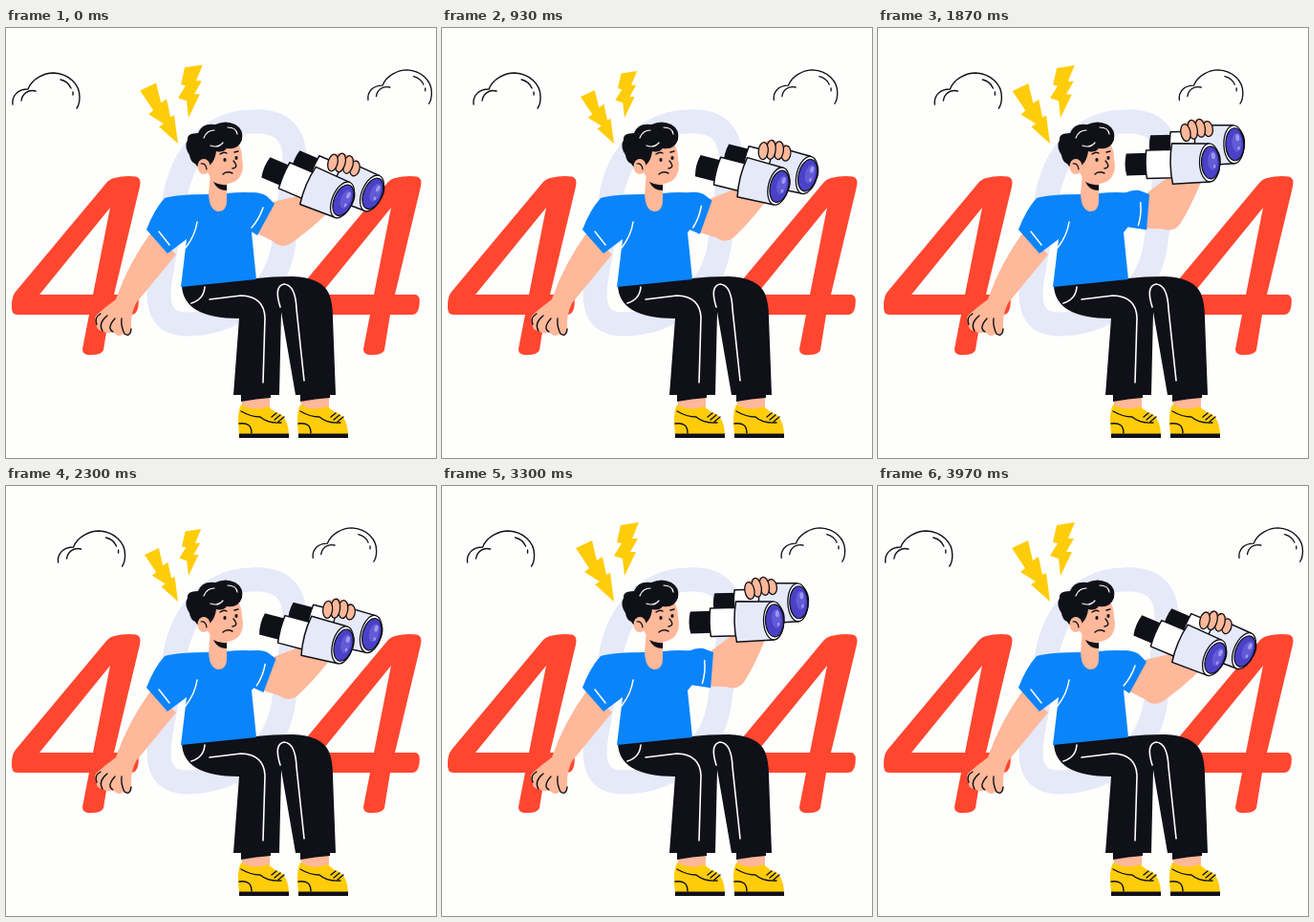
Recreate the animation shown at these times as an HTML page with a canvas. Size 450x450 px, loop 4 s.

```html
<!DOCTYPE html>
<html lang="en">
<head>
<meta charset="utf-8">
<title>404</title>
<style>
html, body { margin: 0; width: 100%; height: 100%; overflow: hidden; background: #fefefc; }
canvas { display: block; width: 100vw; height: 100vh; }
</style>
</head>
<body>
<canvas id="stage" width="450" height="450"></canvas>
<script>
const ctx = document.getElementById('stage').getContext('2d');
const LOOP = 4000;
const C = {
  paper: '#fefefc', pale: '#e5e9f8', orange: '#ff4730', yellow: '#ffcc0a', ink: '#101018',
  skin: '#ffb899', blue: '#0a84fb', white: '#ffffff', lens: '#4a41c8', shine: '#9c98f0'
};

function fill(d, color, rule = 'nonzero') {
  ctx.fillStyle = color;
  ctx.fill(new Path2D(d), rule);
}

function line(d, color = C.ink, width = 1.5) {
  ctx.strokeStyle = color;
  ctx.lineWidth = width;
  ctx.lineCap = ctx.lineJoin = 'round';
  ctx.stroke(new Path2D(d));
}

function oval(x, y, rx, ry, color, outline = 0, turn = 0) {
  ctx.beginPath();
  ctx.ellipse(x, y, rx, ry, turn, 0, Math.PI * 2);
  ctx.fillStyle = color;
  ctx.fill();
  if (outline) {
    ctx.strokeStyle = C.ink;
    ctx.lineWidth = outline;
    ctx.stroke();
  }
}

function shifted(x, y, draw, scale = 1) {
  ctx.save();
  ctx.translate(x, y);
  ctx.scale(scale, scale);
  draw();
  ctx.restore();
}

const ease = u => (1 - Math.cos(Math.PI * u)) / 2;

// Eased value between [time, value] keys
function keyed(keys, t) {
  let i = 1;
  while (i < keys.length - 1 && t > keys[i][0]) i++;
  const [t0, a] = keys[i - 1], [t1, b] = keys[i];
  return a + (b - a) * ease((t - t0) / (t1 - t0));
}

function four() {
  fill('M113 157Q125 154 136 155.5Q142 157 140 166L113 279H135Q140 280 138.5 291Q137 300 131 300H108' +
    'L102 337Q100 342 90 342Q80 343 80 336L87 300H12Q5 300 6 290Q6 281 10 276L106 161Q109 158 113 157Z' +
    'M109 188L35 279H91Z', C.orange, 'evenodd');
}

function zero() {
  line('M258 98C292 96 306 115 301 150L290 230C280 285 230 310 190 310C165 310 157 295 161 265' +
    'L178 170C190 120 225 98 258 98Z', C.pale, 25);
}

function cloud() {
  line('M1 34C0 25 6 18 17 18C21 7 34 1 44 1C60 2 71 13 71 26Q71 34 68 38' +
    'M10 30C11 23 17 18 25 20M51 8Q59 10 62 17M64 21V24', C.ink, 1.4);
}

function bolts(scale) {
  shifted(180, 121, () =>
    fill('M-40 -56L-23 -64L-18 -43L-12 -47L-8 -28L-4 -30L0 0L-20 -18L-15 -21L-31 -31L-26 -35Z', C.yellow), scale);
  shifted(191, 94, () =>
    fill('M-4 -53L15 -56L8 -39L14 -39L6 -25L12 -25L0 0L-2 -18L-11 -21L-3 -34L-8 -35Z', C.yellow), scale);
}

function leftArm() {
  fill('M153 212Q127 248 115 284Q104 292 95 300Q91 305 95 310Q94 316 101 317Q107 321 112 318' +
    'Q118 325 123 320Q130 324 131 315Q130 300 136 288L178 237Z', C.skin);
  line('M99 299Q92 303 95 310M106 301Q96 309 101 317M114 304Q105 314 112 318' +
    'M121 304Q120 312 124 320Q130 324 131 315', C.ink, 1.4);
}

function shoe() {
  fill('M247 383H276V401H247Z', C.skin);
  fill('M246 383H277V387Q262 388 246 391Z', C.ink);
  fill('M246 394Q260 402 274 396L282 402Q295 405 296 425H244Q241 404 246 394Z', C.yellow);
  fill('M244 424.5H296V429H244Z', C.ink);
  line('M246 401Q256 407 266 407Q274 414 288 413M244 414Q257 412 257 424' +
    'M278 407L283 403M281 410L287 405M285 412L291 407', C.ink, 1.4);
}

function legs() {
  shoe();
  shifted(62, 0, shoe);
  fill('M184 269L262 262Q278 260 300 260Q330 261 338 278Q342 288 342 303L345 384H303L288 297L286 384H238' +
    'L244 304Q185 304 184 269Z', C.ink);
  line('M194 288Q207 284 208 271M213 284L246 280Q270 281 271 303L269 371' +
    'M287 292Q280 270 291 268Q303 269 304 294L312 369', C.white, 1.6);
}

function torso() {
  fill('M213 174Q180 174 166 178Q155 190 147 211L169 236L189 221L183 271L262 263L257 214Q270 200 272 184' +
    'L266 173Q248 171 231 173Z', C.blue);
  line('M200 203Q198 217 188 230M160 213L171 227', C.white);
}

function head() {
  fill('M214 150L231 156V180Q231 192 222 192Q213 191 212 174Z', C.skin);
  fill('M217 161Q224 165 231 164V170Q221 170 217 161Z', C.ink);
  fill('M211 128L240 118Q247 124 247 137Q250 148 244 157Q237 164 227 163Q213 160 209 146Z', C.skin);
  fill('M208 147Q201 148 198 142Q193 140 192 133Q186 124 190 117Q189 110 201 110Q205 99 219 101' +
    'Q230 96 240 101Q249 106 247 117Q243 128 231 126Q227 131 220 129Q219 138 214 143Z', C.ink);
  oval(207, 145, 6.5, 8, C.skin);
  line('M204 142Q209 141 210 148', C.ink, 1.2);
  line('M207 115Q210 107 218 107M232 104Q241 104 242 111M214 123Q222 126 227 120', C.white, 1.2);
  oval(229, 138, 1.6, 1.9, C.ink);
  oval(241, 136, 1.6, 1.9, C.ink);
  line('M224 132Q228 129 231 131M239 130L243 129M238 139Q244 146 237 147M227 153Q231 149 237 152', C.ink, 1.4);
}

function barrel() {
  fill('M1 -11.5H24V11.5H1Q-2 0 1 -11.5Z', C.ink);
  const neck = 'M22 -14.5H50V15H22Q20 0 22 -14.5Z';
  fill(neck, C.white);
  line(neck);
  const tube = 'M49 -21L87 -20Q100 -14 99 0Q98 15 88 20L49 21.5Q45 0 49 -21Z';
  fill(tube, C.pale);
  line(tube);
  oval(88, 0, 10.5, 20, C.white, 1.3);
  oval(89, 0, 9.5, 17, C.lens, 1.2);
  oval(91, -2, 5, 10, '#625ad6');
  oval(92, -7, 2, 3.5, C.shine);
  oval(93, 4, 1.3, 2, C.shine);
}

function binoculars() {
  for (const [x, y] of [[302, 138.5], [271, 145.5]]) {
    ctx.save();
    ctx.translate(x, y);
    ctx.rotate(23 * Math.PI / 180);
    barrel();
    ctx.restore();
  }
}

function hand() {
  oval(354, 140, 15, 8, C.skin, 0, 0.3);
  [[365, 147, 8], [358, 143, 9.5], [350, 141, 10], [342, 141, 9]].forEach(([x, y, r]) =>
    oval(x, y, 5, r, C.skin, 1.3, 0.25));
}

function rightArm(turn) {
  ctx.save();
  ctx.translate(259, 172);
  ctx.rotate(turn * Math.PI / 180);
  ctx.translate(-259, -172);
  fill('M270 184L305 176L344 175L335 195Q315 214 297 226Q287 231 279 223L261 214Z', C.skin);
  fill('M243 175Q262 169 273 176L281 184L263 217L246 206Z', C.blue);
  line('M269 188Q265 200 257 209', C.white);
  binoculars();
  hand();
  ctx.restore();
}

const LIFT = [[0, 0], [483, -24.3], [650, -24.3], [967, -8.3], [1333.4, 0]];

function draw(t) {
  ctx.fillStyle = C.paper;
  ctx.fillRect(0, 0, 450, 450);

  zero();
  four();
  shifted(294, 0, four);

  const drift = 1 - Math.abs(t - LOOP / 2) / (LOOP / 2);
  shifted(6 + 56 * drift, 46, cloud);
  shifted(378 - 68 * drift, 43, cloud, 0.95);

  const pulse = Math.cos((t - 617) / (LOOP / 6) * Math.PI * 2);
  bolts(0.9375 + 0.0625 * pulse);

  leftArm();
  legs();
  torso();
  head();
  rightArm(keyed(LIFT, t % (LOOP / 3)));
}

const start = performance.now();
function tick(now) {
  draw(Math.max(0, now - start) % LOOP);
  requestAnimationFrame(tick);
}
draw(0);
requestAnimationFrame(tick);
</script>
</body>
</html>
```
